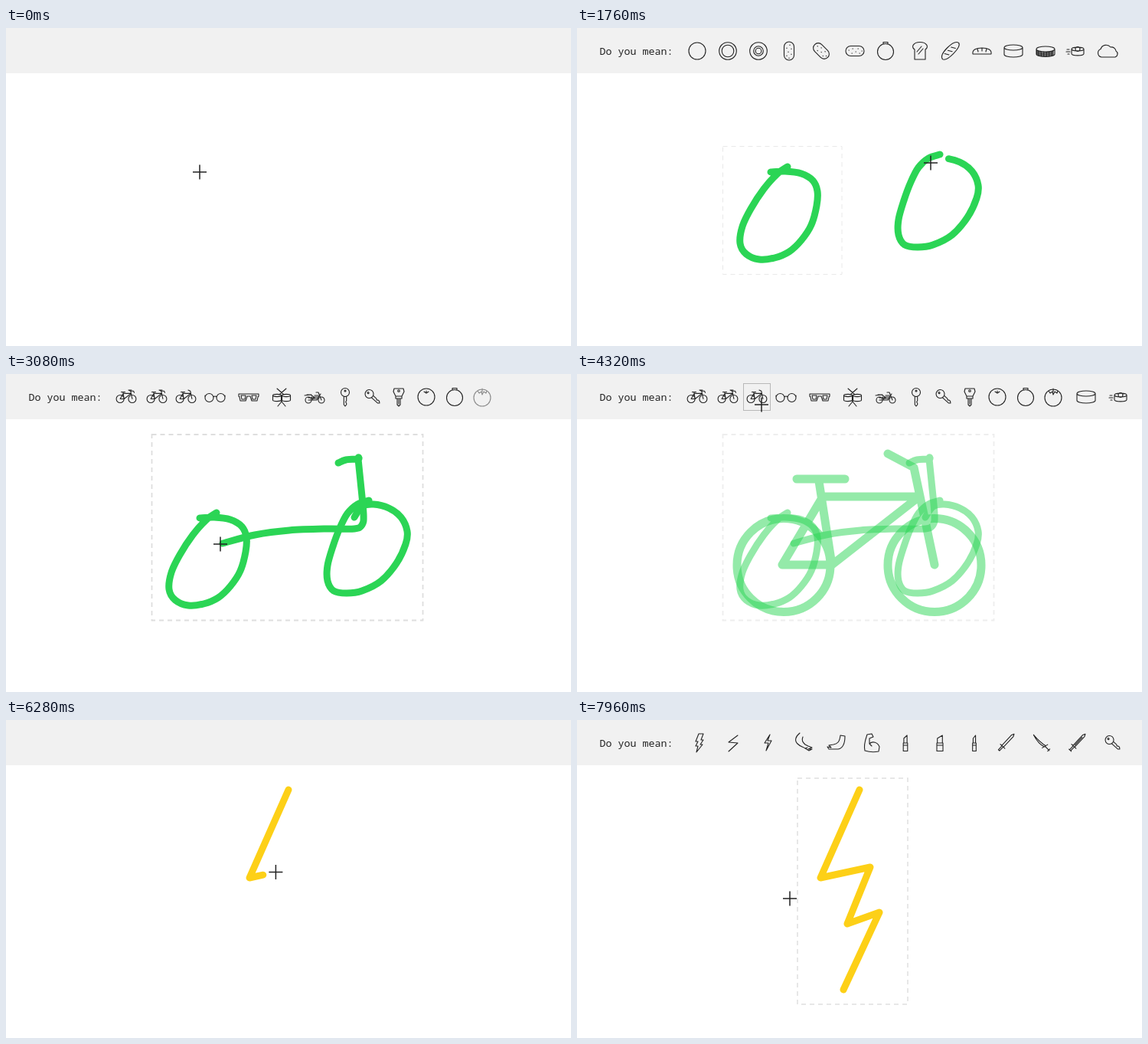
Write an HTML page that moves like this. It is 738 px wide and 415 px high and loops after 8000 ms.

```html
<!DOCTYPE html>
<html lang="en">
<head>
<meta charset="utf-8">
<title>Sketch suggestions</title>
<style>
  html, body { margin: 0; width: 100%; height: 100%; overflow: hidden; background: #fff; }
  svg { display: block; width: 738px; height: 415px; }
  path, rect { fill: none; }
  .pen { stroke-width: 9; stroke-linecap: round; stroke-linejoin: round; }
  .icon { stroke: #222; stroke-width: 1.1; stroke-linecap: round; stroke-linejoin: round; }
  text { font: 13.33px "Noto Sans Mono", "DejaVu Sans Mono", monospace; fill: #222; }
</style>
</head>
<body>
<svg id="stage" viewBox="0 0 738 415"></svg>
<script>
const LOOP = 8000, STEP = 40;
const GREEN = '#2bd555', YELLOW = '#fdd017';
const stage = document.getElementById('stage');

function add(tag, attrs, parent = stage) {
  const el = document.createElementNS('http://www.w3.org/2000/svg', tag);
  for (const k in attrs) el.setAttribute(k, attrs[k]);
  parent.appendChild(el);
  return el;
}
const clamp = v => Math.max(0, Math.min(1, v));
const ease = k => k * k * (3 - 2 * k);
const show = (el, a) => el.setAttribute('opacity', +a);

// Smooth curve through a few points
function spline(text) {
  const p = text.split(' ').map(s => s.split(',').map(Number));
  const at = i => p[Math.max(0, Math.min(p.length - 1, i))];
  let d = 'M' + p[0];
  for (let i = 0; i < p.length - 1; i++) {
    const [a, b, c, e] = [at(i - 1), at(i), at(i + 1), at(i + 2)];
    const c1 = b.map((v, j) => v + (c[j] - a[j]) / 6);
    const c2 = c.map((v, j) => v - (e[j] - b[j]) / 6);
    d += `C${c1} ${c2} ${c}`;
  }
  return d;
}

// Linear interpolation in [time, value] pairs
function track(keys, t) {
  if (t <= keys[0][0]) return keys[0][1];
  for (let i = 1; i < keys.length; i++) {
    const [t0, a] = keys[i - 1], [t1, b] = keys[i];
    if (t < t1) return a + (b - a) * (t - t0) / (t1 - t0);
  }
  return keys[keys.length - 1][1];
}

// Icon shapes, centred on 0,0
const ring = (x, y, r) => `M${x - r},${y}a${r},${r} 0 1 0 ${2 * r},0a${r},${r} 0 1 0 ${-2 * r},0`;
const dots = list => list.split(' ').map(p => `M${p}h.4`).join('');
const drum = (x, y, w, h) => {
  const e = w / 3.4;
  return `M${x - w},${y}a${w},${e} 0 1 0 ${2 * w},0a${w},${e} 0 1 0 ${-2 * w},0v${h}a${w},${e} 0 0 0 ${2 * w},0v${-h}`;
};
let hatch = '';
for (let x = -11; x <= 11; x += 1.4) {
  const dip = 3.5 * Math.sqrt(1 - x * x / 144);
  hatch += `M${x},${-2.5 + dip}v6.5`;
}
const bike = ring(-7.9, 2.5, 5) + ring(7.9, 2.5, 5) +
  'M-7.9,2.5L-3.8,-4.6H6.4L-2.8,2.5H-7.9M-2.8,2.5L-4.2,-6.5M-6.5,-6.5H-1.5M7.9,2.5L5.8,-7.7L3,-9';
const pill = 'M-12,0a6.5,6.5 0 0 1 6.5,-6.5H5.5a6.5,6.5 0 0 1 0,13H-5.5a6.5,6.5 0 0 1 -6.5,-6.5' +
  dots('-8,-1 -4,3 -3,-3 1,1 4,-3 6,3 9,0');
const ball = ring(0, 1, 10.5) + 'M-3,-9.5v-2h6v2';
const key = ring(0, -6, 5.5) + ring(0, -8, 1) + 'M-1.7,-.5V10L0,12L1.7,10V8L.5,6.5L1.7,5V-.5';
const stick = w => `M${-w},0H${w}V10.5H${-w}ZM${-w + .7},0V-6L${w - .7},-10V0M${-w},3H${w}`;
const blade = 'M0,-16L-1.5,-13V6H1.5V-13ZM-4,6H4M-1,6V13H1V6';

const ICONS = {
  circle: ring(0, 0, 11),
  plate: ring(0, 0, 11.3) + ring(0, 0, 7.8),
  rings: ring(0, 0, 11.3) + ring(0, 0, 6.3) + ring(0, 0, 3.8),
  pill, ball, bike, key,
  bikeBar: bike + 'M5.8,-7.7H9.5l1,2M3,-9H7',
  bread: 'M-7,11V-2C-12,-5 -9,-11.5 0,-11.5S12,-5 7,-2V11ZM-4,1L2,-6M-2,4L4,-3',
  baguette: 'M-15,0C-14,-6 -5,-6 0,-6S14,-6 15,0C14,5 5,5 0,5S-14,5 -15,0M-8,-3l3,5M-2,-3l3,5M4,-3l3,5',
  loaf: 'M-12,4C-13,-2 -7,-4 0,-4S13,-2 12,4ZM-6,-3l1,4M0,-4v4M6,-3l-1,4',
  cheese: drum(0, -4.5, 12, 9),
  puck: drum(0, -2.5, 12, 6.5) + hatch,
  fastPuck: drum(3, -2.5, 8, 6) + ring(3, -2.5, 3) + 'M-8,-2h-3M-7,1h-5M-8,4h-2',
  cloud: 'M-9,8a5.5,5.5 0 0 1 -1,-10.5A7.5,7.5 0 0 1 3,-5A6,6 0 0 1 10,0A4.5,4.5 0 0 1 9,8Z',
  glasses: ring(-7.5, 1, 5.5) + ring(7.5, 1, 5.5) + 'M-2,0Q0,-2 2,0M-13,0v-2M13,0v-2',
  shades: 'M-13,-4H13V-1L12,0L11,5H4L2,-1H-2L-4,5H-11L-12,0L-13,-1ZM-10,-2H-4L-5,3H-9ZM4,-2H10L9,3H5Z',
  drums: drum(-6, -2, 5.5, 6) + drum(6, -2, 5.5, 6) + 'M-6,-11L3,-3M6,-11L-3,-3M-5,12L0,6L5,12M0,6V1',
  moto: ring(-8, 4, 4) + ring(9, 4, 4) +
    'M-13,-2L-5,-3L-1,0H5L8,-4M9,4L5,-6H2M-8,4H3L6,-1M-4,0L-2,4M-10,-3H-4M-2,2H4M0,-2H5M-8,1H0',
  carKey: 'M-6,-11H6L7,-7L4,-1H-4L-7,-7ZM-4,-1V2H4V-1M-2,2V10L0,12L2,10V2M0,3V9' + ring(0, -8, 1.3),
  orange: ring(0, 0, 11) + 'M-3,-7L0,-5L3,-7M0,-5V-8',
  tomato: ring(0, 1, 11) + 'M-6,-8L-4,-5L-1,-7L0,-3L2,-7L5,-5L6,-8M0,-7V-11',
  bolt: 'M-1,-12H5L2,-4H5L1,2H4L-4,12L-2,4H-5L-2,-2H-5Z',
  zigzag: 'M6,-10L-6,-1L6,0L-6,11',
  bolt3: 'M3,-11L-4,0L1,0L-2,10L5,-3H0L3,-11',
  hand: 'M-4,-13C-10,-8 -11,-3 -7,1C-3,5 0,5 3,7L8,10L12,8H7L12,6L7,4L3,2C0,-1 -2,-3 0,-8M3,7L6,6',
  arm: 'M5,-10L11,-9C11,0 8,7 2,8H-10L-12,5L-7,6L-10,3L-4,2C1,1 4,-1 5,-10',
  flex: 'M-9,10C-11,2 -8,-5 -6,-11L0,-12L2,-8L-3,-6L-3,1C1,-3 8,-1 10,5L9,11Q0,13 -9,10M-3,1L0,4',
  stick: stick(2.8), stickWide: stick(4), stickThin: stick(2.3),
  blade, sabre: 'M0,-15Q-4,-2 -1,6H1Q-1,-2 0,-15M-4,5L4,7M0,6V14M-2,13H2', dagger: blade + 'M-2,13H2M0,-10V4'
};

const SETS = [
  { on: 845, gap: 29, off: 1880, box: [190.5, 154.5, 155.5, 167], ink: '#e9e9e9', w: 1,
    icons: 'circle,157 plate,197 rings,237 pill,277,90 pill,319,45 pill,363 ball,403 bread,448 baguette,488,-45 ' +
      'loaf,529 cheese,570 puck,612 fastPuck,651 cloud,694' },
  { on: 1880, gap: 25, off: 2768, box: [190.5, 138, 354, 183.5], ink: '#e5e5e5', w: 1.5,
    icons: 'glasses,159 shades,203 drums,246 bike,289 bikeBar,330 circle,371 plate,411 rings,451 ball,490 ' +
      'orange,529 tomato,568 cheese,610 fastPuck,651 cloud,694' },
  { on: 2768, gap: 25, off: 5600, box: [190.5, 79, 354, 242.5], ink: '#dedede', w: 1.8,
    icons: 'bikeBar,157 bikeBar,197 bike,235 glasses,273 shades,317 drums,360 moto,403 key,443 key,479,-48 ' +
      'carKey,513 orange,549 ball,586 tomato,622 cheese,665 fastPuck,707' },
  { on: 7100, gap: 29, off: LOOP, box: [288, 76, 144, 295], ink: '#e0e0e0', w: 1.5,
    icons: 'bolt,160 zigzag,204 bolt3,249 hand,295 arm,339 flex,385 stick,429 stickWide,474 stickThin,519 ' +
      'blade,560,43 sabre,607,-45 dagger,653,43 key,700,-48' }
];

const STROKES = [
  { color: GREEN, keys: [[340, 0], [800, 1]], d: spline('253,188 272,187 293,190 308,199 314,213 313,232 306,257 ' +
    '293,277 277,292 258,300 238,302 221,295 213,281 216,259 227,236 244,210 262,190 275,181') },
  { color: GREEN, keys: [[1200, 0], [1780, 1]], d: spline('474,165 459,170 446,182 436,201 427,225 420,250 420,270 ' +
    '428,283 445,286 465,283 490,270 510,247 522,222 524,205 516,187 500,175 480,170 465,173 455,187') },
  { color: GREEN, keys: [[2120, 0], [2640, 1]], d: spline('434,116 444,112 460,111 460,111 463,140 467,183 465,197 ' +
    '455,202 420,202 370,204 325,210 283,221') },
  { color: YELLOW, keys: [[5900, 0], [6280, .376], [6720, .908], [6800, 1]],
    d: 'M369,91L318,206L383,192L353,266L395,251L348,352' }
];

// Pointer rests and moves: time, x, y
const MOVES = [
  [340, 253, 188], [800, 275, 181], [880, 276, 181], [960, 290, 177], [1200, 474, 165], [1780, 455, 187],
  [1880, 455, 187], [2120, 434, 116], [2640, 283, 221], [3080, 280, 222], [3680, 277, 205], [4040, 241, 40],
  [4920, 241, 40], [5360, 371, 91], [5900, 371, 91], [6800, 348, 352], [7840, 348, 353], [7960, 278, 233]
];

add('rect', { width: 738, height: 59, style: 'fill:#f1f1f1' });
const label = add('text', { x: 29.5, y: 35 });
label.textContent = 'Do you mean:';
const pick = add('rect', { x: 217.5, y: 12.5, width: 35, height: 35, stroke: '#b8b8b8' });

for (const s of SETS) {
  const [x, y, width, height] = s.box;
  s.frame = add('rect', { x, y, width, height, stroke: s.ink, 'stroke-width': s.w, 'stroke-dasharray': '6 5' });
  s.els = s.icons.split(' ').map(item => {
    const [name, cx, turn = 0] = item.split(',');
    return add('path', { class: 'icon', d: ICONS[name], transform: `translate(${cx} 30) rotate(${turn})` });
  });
}
for (const s of STROKES) {
  s.el = add('path', { class: 'pen', d: s.d, stroke: s.color });
  s.len = s.el.getTotalLength();
}
const result = add('path', {
  class: 'pen', stroke: GREEN, style: 'stroke-width:11',
  d: ring(270, 249.5, 61) + ring(467, 249.5, 61) +
    'M287,137H350M316,140L333,249M321,160L268,249H333L447,160H321M406,104L440,122L467,249'
});
const cross = add('path', { d: 'M-9,0H9M0,-9.5V9.5', stroke: '#222', 'stroke-width': 1.5 });

function pointer(t) {
  for (const s of STROKES) {
    if (t >= s.keys[0][0] && t < s.keys[s.keys.length - 1][0]) {
      const p = s.el.getPointAtLength(track(s.keys, t) * s.len);
      return [p.x, p.y];
    }
  }
  let i = MOVES.findIndex(m => t < m[0]);
  if (i < 0) i = MOVES.length;
  const a = MOVES[Math.max(0, i - 1)], b = MOVES[i] || a;
  const k = b[0] > a[0] ? ease(clamp((t - a[0]) / (b[0] - a[0]))) : 0;
  return [a[1] + (b[1] - a[1]) * k, a[2] + (b[2] - a[2]) * k];
}

function draw(t) {
  const swap = clamp((t - 4200) / 240);
  show(label, SETS.some(s => t >= s.on && t < s.off));
  show(pick, t >= 4240 && t < 5600);
  for (const s of SETS) {
    const live = t >= s.on && t < s.off;
    show(s.frame, live ? (s.on < 4200 ? 1 - swap : 1) : 0);
    s.els.forEach((el, i) => show(el, live ? clamp((t - s.on - i * s.gap) / 24) : 0));
  }
  for (const s of STROKES) {
    const k = track(s.keys, t - STEP);
    s.el.setAttribute('stroke-dasharray', k < 1 ? `${k * s.len} 2000` : 'none');
    show(s.el, k > 0 ? (s.color === GREEN ? 1 - swap : 1) : 0);
  }
  show(result, t < 5600 ? swap : 0);
  const [x, y] = pointer(t);
  cross.setAttribute('transform', `translate(${x.toFixed(1)} ${y.toFixed(1)})`);
}

const start = performance.now();
function tick() {
  const t = (performance.now() - start) % LOOP;
  draw(Math.floor(t / STEP) * STEP);
  requestAnimationFrame(tick);
}
tick();
</script>
</body>
</html>
```
